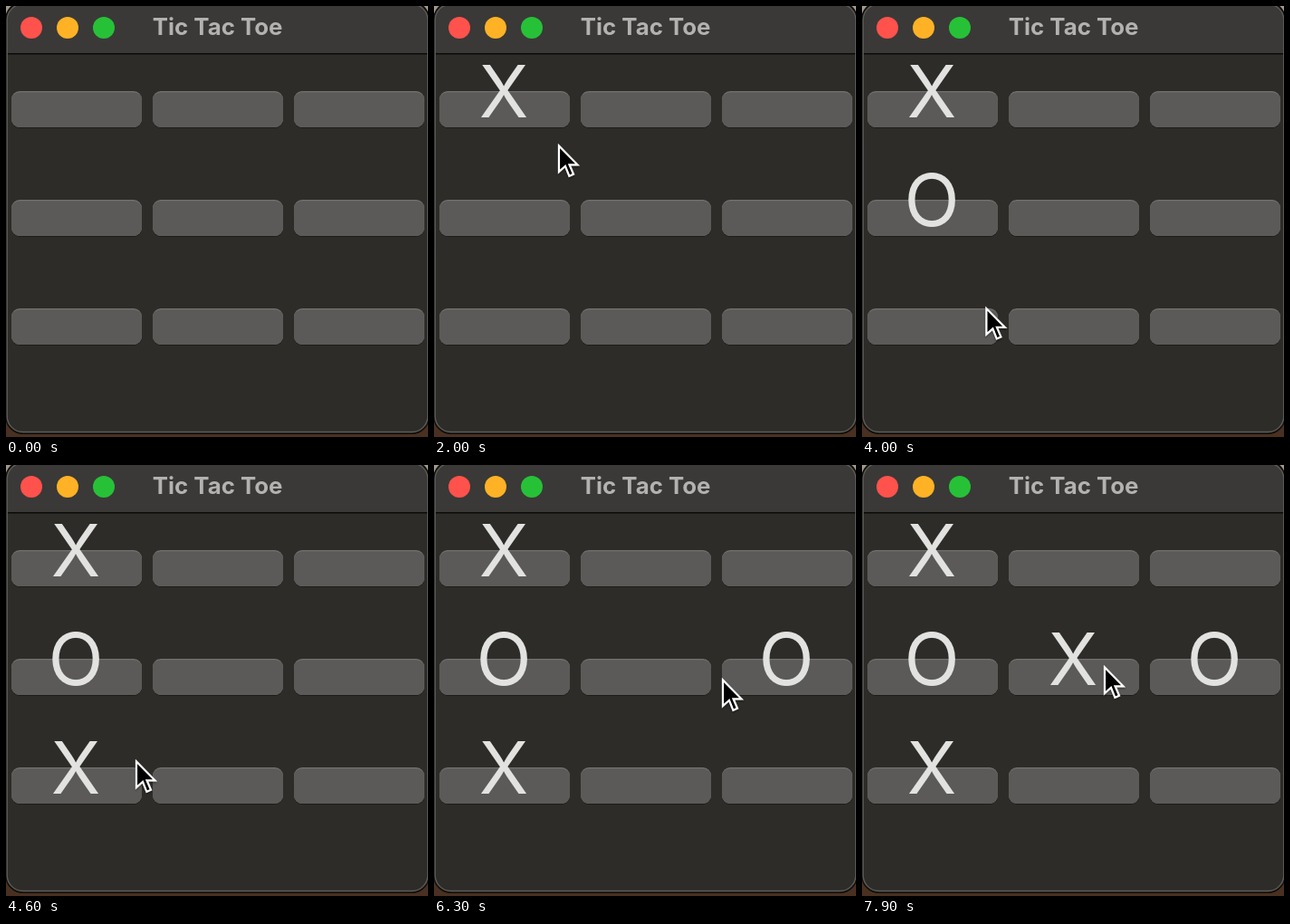
An HTML page that plays this animation: 466 by 476 pixels, repeating every 8 s.

```html
<!DOCTYPE html>
<html lang="en">
<head>
<meta charset="utf-8">
<title>Tic Tac Toe</title>
<style>
  html, body { margin: 0; width: 100%; height: 100%; overflow: hidden; background: #4a3323; }
  svg { display: block; width: 466px; height: 476px; }
  text { font-family: Inter, "Liberation Sans", sans-serif; text-anchor: middle; }
  .title { font-size: 25.8px; font-weight: 700; fill: #b3b2b0; }
  .mark { font-size: 80px; fill: #e2e2e0; }
</style>
</head>
<body>
<svg viewBox="0 0 466 476" xmlns="http://www.w3.org/2000/svg">
  <defs>
    <linearGradient id="desk" x2="0" y2="1">
      <stop offset="0" stop-color="#a39a8a"/>
      <stop offset=".3" stop-color="#4b4640"/>
      <stop offset="1" stop-color="#4a3020"/>
    </linearGradient>
    <clipPath id="frame"><rect x="0" y="-4" width="467" height="476" rx="19"/></clipPath>
    <filter id="soft" x="-30%" y="-30%" width="180%" height="180%">
      <feDropShadow dx="0" dy="1.5" stdDeviation="1.2" flood-opacity=".4"/>
    </filter>
  </defs>
  <rect width="466" height="476" fill="url(#desk)"/>
  <g clip-path="url(#frame)">
    <rect y="-4" width="467" height="476" fill="#2d2c28"/>
    <rect y="-4" width="467" height="56" fill="#3a3937"/>
    <rect y="52" width="467" height="1.5" fill="#0b0b0a"/>
  </g>
  <rect x="0" y="-4" width="467" height="476" rx="19" fill="none" stroke="#11100e" stroke-width="2"/>
  <rect x="1.2" y="-2" width="464.6" height="472.5" rx="17.5" fill="none" stroke="#5d5c59" stroke-width="1.4"/>
  <circle cx="28" cy="24" r="12" fill="#ff524c"/>
  <circle cx="68" cy="24" r="12" fill="#ffb225"/>
  <circle cx="108" cy="24" r="12" fill="#27c138"/>
  <text class="title" x="233.6" y="32">Tic Tac Toe</text>
  <g id="board"></g>
  <g id="marks"></g>
  <g id="pointer" filter="url(#soft)">
    <path d="M1 2.5V31L8 24.8L12.4 35.8L17 33.8L12.5 23.3H21.5Z" fill="#000" stroke="#fff" stroke-width="2.2"/>
  </g>
</svg>
<script>
const LOOP = 8000, STEP = 100;
const $ = id => document.getElementById(id);

function add(parent, tag, attrs) {
  const el = document.createElementNS("http://www.w3.org/2000/svg", tag);
  for (const key in attrs) el.setAttribute(key, attrs[key]);
  return parent.appendChild(el);
}

const colX = col => 6 + 156 * col;
const rowY = row => 94 + 120 * row;

for (let i = 0; i < 9; i++) {
  const x = colX(i % 3), y = rowY(Math.floor(i / 3));
  const box = { width: 144, height: 40, rx: 9 };
  add($("board"), "rect", { ...box, x, y: y + 1, fill: "#1d1c19" });
  add($("board"), "rect", { ...box, x, y, fill: "#747270" });
  add($("board"), "rect", { ...box, x, y: y + 1.2, height: 38.8, fill: "#5b5a58" });
}

// letter, column, row, time placed
const moves = [
  ["X", 0, 0, 1300],
  ["O", 0, 1, 2800],
  ["X", 0, 2, 4100],
  ["O", 2, 1, 5800],
  ["X", 1, 1, 7800]
].map(([letter, col, row, at]) => {
  const el = add($("marks"), "text", { class: "mark", x: colX(col) + 71, y: rowY(row) + 28.5 });
  el.textContent = letter;
  return { el, at };
});

// time, tip x, tip y
const path = [
  [700, 205, 240], [1000, 123, 111], [1500, 122, 113], [2000, 137, 152],
  [2600, 122, 226], [2800, 122, 226], [3200, 120, 229], [3900, 136, 332],
  [4600, 143, 325], [5500, 368, 238], [5900, 362, 236], [6300, 318, 235],
  [7000, 256, 230], [7600, 266, 222], [7800, 266, 222], [7900, 267, 221]
];

function pointAt(t) {
  const next = path.findIndex(p => p[0] > t);
  if (next < 0) return path[path.length - 1].slice(1);
  const a = path[next - 1], b = path[next];
  const u = (t - a[0]) / (b[0] - a[0]);
  const k = u * u * (3 - 2 * u);
  return [a[1] + (b[1] - a[1]) * k, a[2] + (b[2] - a[2]) * k];
}

function render(ms) {
  const t = Math.floor((ms % LOOP) / STEP) * STEP;
  for (const { el, at } of moves) el.style.display = t >= at ? "" : "none";
  const shown = t >= path[0][0];
  $("pointer").style.display = shown ? "" : "none";
  if (shown) {
    const [x, y] = pointAt(t);
    $("pointer").setAttribute("transform", `translate(${x.toFixed(1)} ${y.toFixed(1)})`);
  }
}

const start = performance.now();
function tick() {
  render(performance.now() - start);
  requestAnimationFrame(tick);
}
tick();
</script>
</body>
</html>
```
